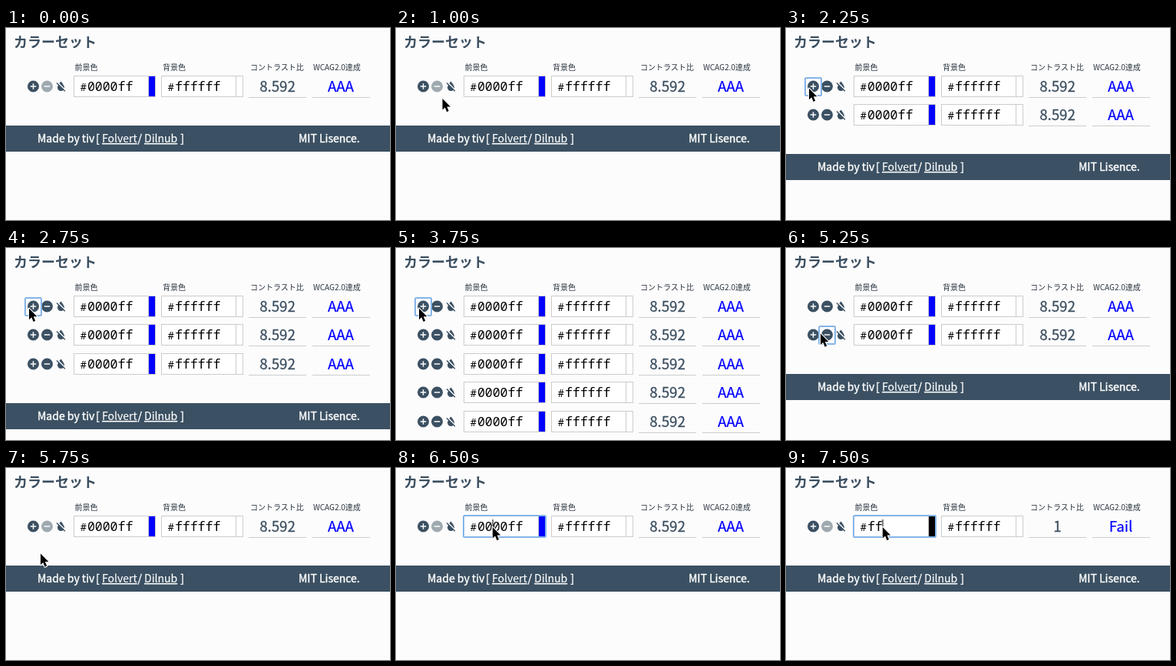
Animation, 500 px wide and 250 px high, one loop 8000 ms. Source, as an HTML page:

```html
<!DOCTYPE html>
<html lang="ja">
<head>
<meta charset="utf-8">
<title>カラーセット</title>
<style>
html, body { margin: 0; width: 100%; height: 100%; overflow: hidden; background: #fdfcfd; }
svg { display: block; width: 500px; height: 250px; }
text { font-family: "Noto Sans CJK JP", "Noto Sans CJK", "Noto Sans", sans-serif; fill: #3b4f60; white-space: pre; }
.title { font-size: 18px; font-weight: 700; }
.label { font-size: 10px; fill: #26323c; }
.code { font: 16.5px "Noto Sans Mono", monospace; fill: #000; }
.hash { font-size: 13.5px; }
.value { font-size: 18.7px; text-anchor: middle; stroke: #3b4f60; stroke-width: .3; }
.grade { fill: #00f; stroke: #00f; stroke-width: .2; }
.foot text { font-size: 14px; fill: #fff; stroke: #fff; stroke-width: .4; }
.foot .link { text-decoration: underline; stroke-width: .15; }
.box { fill: #fff; stroke: #ccc; }
.line { stroke: #ccc; }
.icon { fill: #3b5062; }
.focus { fill: none; stroke: #83b4e8; stroke-width: 2; }
</style>
</head>
<body>
<svg viewBox="0 0 500 250">
  <defs>
    <path id="plus" d="M12 2a10 10 0 1 0 0 20a10 10 0 1 0 0-20zm5 11h-4v4h-2v-4H7v-2h4V7h2v4h4z"/>
    <path id="minus" d="M12 2a10 10 0 1 0 0 20a10 10 0 1 0 0-20zm5 11H7v-2h10z"/>
    <path id="drop" d="M18 14c0-4-6-10.8-6-10.8s-1.33 1.51-2.73 3.52l8.59 8.59c.09-.42.14-.86.14-1.31zm-.88 3.12L5.27 5.27 4 6.55l3.32 3.32C6.55 11.33 6 12.79 6 14c0 3.31 2.69 6 6 6 1.52 0 2.9-.57 3.96-1.5l2.63 2.63 1.27-1.27z"/>
  </defs>
  <rect width="500" height="250" fill="#fdfcfd"/>
  <text class="title" x="10" y="24.5">カラーセット</text>
  <text class="label" x="89.5" y="54.7">前景色</text>
  <text class="label" x="204" y="54.7">背景色</text>
  <text class="label" x="318" y="54.7">コントラスト比</text>
  <text class="label" x="400" y="54.7">WCAG2.0達成</text>
  <g id="rows"></g>
  <g id="foot" class="foot">
    <rect y="127" width="500" height="34" fill="#3b5062"/>
    <text x="41" y="149">Made by tiv</text>
    <text x="117" y="149">[</text>
    <text class="link" x="125" y="149">Folvert</text>
    <text x="171.5" y="149">/</text>
    <text class="link" x="180" y="149">Dilnub</text>
    <text x="227.3" y="149">]</text>
    <text x="381" y="149">MIT Lisence.</text>
  </g>
  <rect id="ring" class="focus" rx="1.5"/>
  <rect id="caret" x="125.5" y="67" width="1" height="18"/>
  <path id="cursor" d="M0 0V14.6L3.3 11.5L5.7 17.2L8.2 16.1L5.8 10.6H10.4Z" stroke="#fff" stroke-width="2.2" stroke-linejoin="round" paint-order="stroke"/>
</svg>
<script>
const LOOP = 8000, PITCH = 37.5;
const $ = id => document.getElementById(id);

// Each track lists [start time, value]; values hold until the next start.
const tracks = {
  count: [[0, 1], [2250, 2], [2750, 3], [3250, 4], [3750, 5], [4750, 4], [5000, 3], [5250, 2], [5750, 1]],
  cursor: [[0, null], [250, [110, 21]], [500, [71, 121]], [750, [96, 98]], [1000, [60.5, 92]],
    [1250, [27.5, 82]], [1500, [29.5, 80]], [2000, [30, 78.7]], [4000, [27.5, 82]],
    [4250, [43.5, 110]], [4500, [45, 111.5]], [6000, [121.5, 79]], [6250, [125.8, 77]]],
  focus: [[0, null], [2250, "add"], [4750, "remove"], [5750, null], [6500, "input"]],
  edit: [[0, "idle"], [6500, "caret"], [6750, "select"], [7500, "typed"]]
};
const offset = i => Math.floor(i * PITCH);
const rings = {
  add: [25, 65, 21, 23],
  remove: [43, 65 + offset(1), 21, 23],
  input: [88, 62, 107, 28]
};

const at = (track, t) => track.filter(k => k[0] <= t).pop()[1];
const show = (el, on) => el.setAttribute("display", on ? "inline" : "none");
const set = (el, attrs) => { for (const k in attrs) el.setAttribute(k, attrs[k]); };
const icon = (name, x) => `<use class="icon ${name}" href="#${name}" transform="translate(${x} 67) scale(.75)"/>`;
const field = (name, x, digits, color) => `
  <rect class="box" x="${x + .5}" y="62.5" width="106" height="27"/>
  <rect class="mark" x="${x + 18}" y="67" width="59.5" height="18" fill="#b4d5fe" display="none"/>
  <text class="code hash" x="${x + 8.7}" y="82">#</text>
  <text class="code ${name}" x="${x + 17.9}" y="82.3">${digits}</text>
  <path class="line" d="M${x + 97.5} 62V90"/>
  <rect class="swatch" x="${x + 98}" y="63" width="8" height="26" fill="${color}"/>`;

const rowMarkup = i => `<g transform="translate(0 ${offset(i)})">
  ${icon("plus", 26.5)}${icon("minus", 44.5)}${icon("drop", 62.5)}
  ${field("front", 88, "0000ff", "#00f")}${field("back", 202, "ffffff", "#fff")}
  <text class="value ratio" x="353.5" y="83">8.592</text>
  <text class="value grade" x="436" y="83">AAA</text>
  <path class="line" d="M316 90.5H391M399 90.5H474"/>
</g>`;

$("rows").innerHTML = [0, 1, 2, 3, 4].map(rowMarkup).join("");
const rows = [...$("rows").children];
const first = name => rows[0].querySelector("." + name);

function draw(t) {
  const count = at(tracks.count, t);
  const pos = at(tracks.cursor, t);
  const focus = at(tracks.focus, t);
  const edit = at(tracks.edit, t);
  const typed = edit === "typed";

  rows.forEach((row, i) => show(row, i < count));
  first("minus").style.fill = count > 1 ? "" : "#9fa9b0";
  $("foot").setAttribute("transform", `translate(0 ${offset(count - 1)})`);

  first("front").textContent = typed ? "ff" : "0000ff";
  first("ratio").textContent = typed ? "1" : "8.592";
  first("grade").textContent = typed ? "Fail" : "AAA";
  first("swatch").setAttribute("fill", typed ? "#000" : "#00f");
  show(first("mark"), edit === "select");
  show($("caret"), typed || edit === "caret");

  show($("ring"), focus);
  if (focus) {
    const [x, y, width, height] = rings[focus];
    set($("ring"), { x, y, width, height });
  }
  show($("cursor"), pos);
  if (pos) $("cursor").setAttribute("transform", `translate(${pos})`);
}

const start = performance.now();
function tick() {
  draw((performance.now() - start) % LOOP);
  requestAnimationFrame(tick);
}
tick();
</script>
</body>
</html>
```
